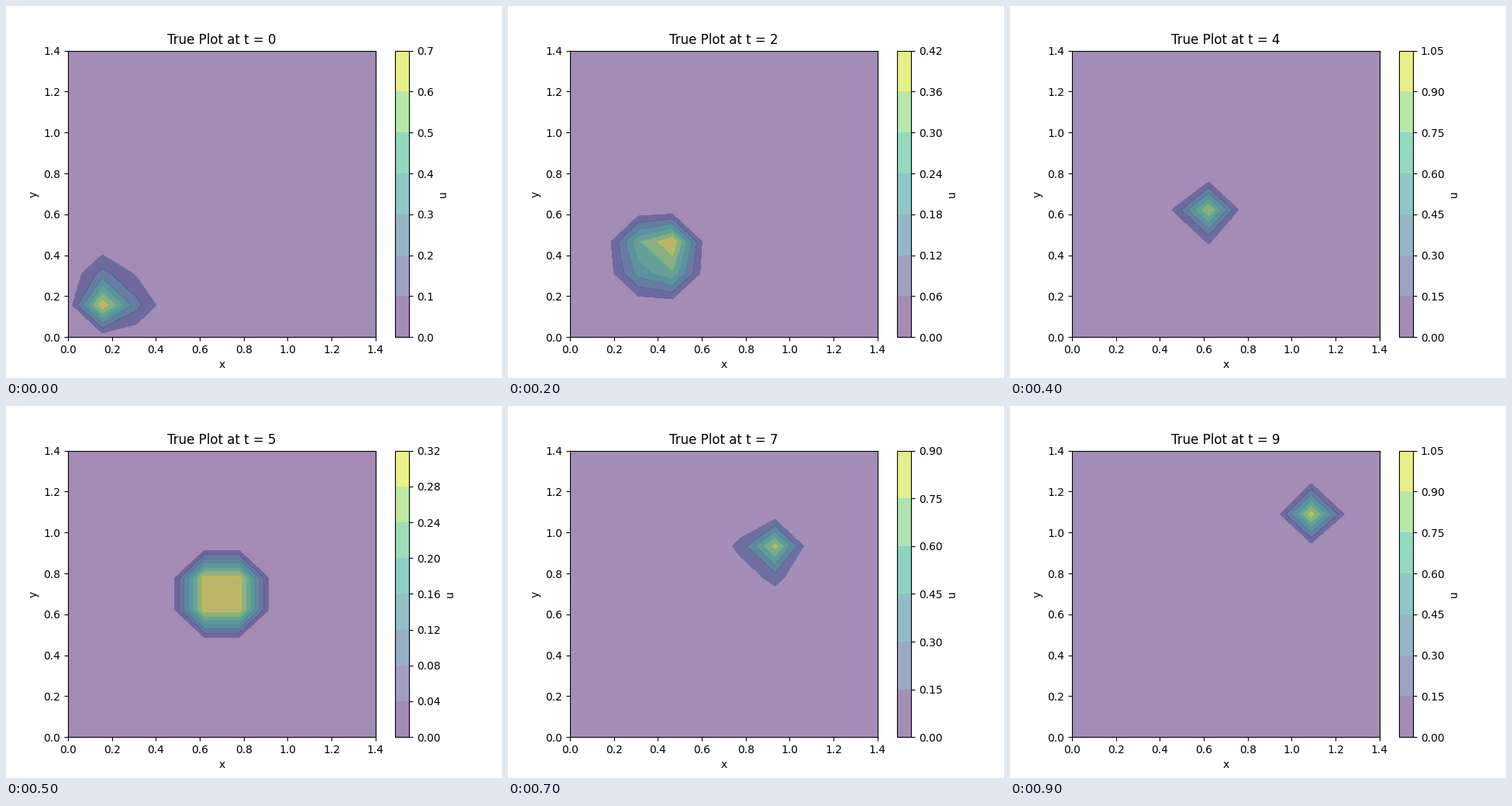
A matplotlib script that plays this animation: 640x480 px, repeating every 1 s.

```python
import numpy as np
import matplotlib.pyplot as plt
from matplotlib.animation import FuncAnimation
from matplotlib.path import Path

SIDE, POINTS, FRAMES = 1.4, 10, 10

axis = np.linspace(0, SIDE, POINTS)
X, Y = np.meshgrid(axis, axis)
domain = Path(SIDE * np.array([(0, 0), (1, 0), (1, 1), (0, 1), (0, 0)]), closed=True)

fig = plt.figure(figsize=(6.4, 4.8), dpi=100)


def pulse(t):
    """Gaussian travelling along the diagonal, sampled on the coarse grid."""
    centre = 0.2 + 0.1 * t
    return np.exp(-100 * ((X - centre) ** 2 + (Y - centre) ** 2))


def draw(t):
    fig.clf()
    ax = fig.add_subplot()
    bands = ax.contourf(X, Y, pulse(t), alpha=0.5)
    # The lowest band covers the whole domain, beneath the others.
    bands.get_paths()[0] = domain
    fig.colorbar(bands, ax=ax, label="u")
    ax.set(xlabel="x", ylabel="y", title=f"True Plot at t = {t}",
           xlim=(0, SIDE), ylim=(0, SIDE))
    return []


anim = FuncAnimation(fig, draw, frames=FRAMES, interval=100, repeat=True)
plt.show()
```
